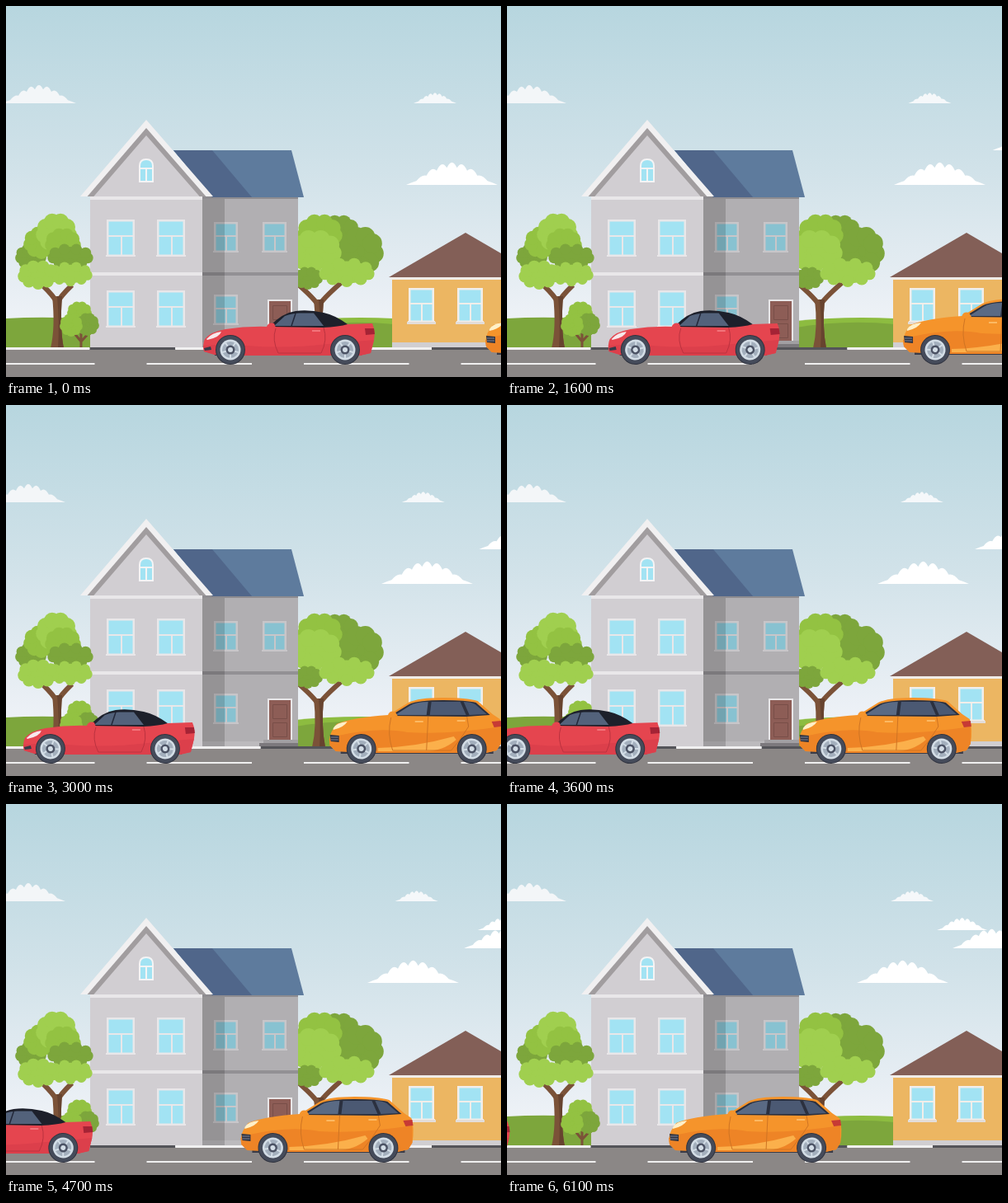
These frames come from a looping animation (600x450 px, 6.2 s). An HTML page with a canvas:

```html
<!DOCTYPE html>
<html lang="en">
<head>
<meta charset="utf-8">
<title>Street</title>
<style>
html, body { margin: 0; width: 100%; height: 100%; overflow: hidden; }
canvas { display: block; }
</style>
</head>
<body>
<canvas id="stage" width="600" height="450"></canvas>
<script>
const ctx = document.getElementById('stage').getContext('2d');
const LOOP = 6200, STEP = 100;
const LEAF = { dark: '#7da63c', mid: '#93c242', light: '#a0cf4f' };
const GLASS = '#a2e3f3', WALL = '#d1ced2', TRIM = '#e9e7e9';

function shape(color, path) {
  ctx.fillStyle = color;
  ctx.fill(new Path2D(path));
}
function line(color, width, path) {
  ctx.strokeStyle = color;
  ctx.lineWidth = width;
  ctx.stroke(new Path2D(path));
}
function rect(color, x, y, w, h) {
  ctx.fillStyle = color;
  ctx.fillRect(x, y, w, h);
}
function disc(color, x, y, rx, ry = rx) {
  ctx.fillStyle = color;
  ctx.beginPath();
  ctx.ellipse(x, y, rx, ry, 0, 0, 2 * Math.PI);
  ctx.fill();
}
function at(x, y, draw) {
  ctx.save();
  ctx.translate(x, y);
  draw();
  ctx.restore();
}

function sky() {
  const g = ctx.createLinearGradient(0, 0, 0, 400);
  g.addColorStop(0, '#b7d6df');
  g.addColorStop(0.5, '#d1e2e9');
  g.addColorStop(1, '#f1f3f8');
  rect(g, 0, 0, 600, 450);
}

// Bumps follow a sine profile above a flat base that starts at (x, y).
function cloud(x, y, width, color) {
  const bumps = 9;
  const height = u => 0.19 * width * Math.sin(Math.PI * u) ** 1.4;
  ctx.fillStyle = color;
  ctx.beginPath();
  ctx.moveTo(x, y);
  for (let i = 1; i <= bumps; i++) {
    const mid = (i - 0.5) / bumps, end = i / bumps;
    ctx.quadraticCurveTo(x + width * mid, y - 1.6 * height(mid), x + width * end, y - height(end));
  }
  ctx.fill();
}

function clouds(t) {
  cloud(-5 - 13 * Math.min(t / 700, 1), 118, 90, '#f3f6f8');
  cloud(494 - t * 0.00475, 118, 52, '#f5f8fa');
  cloud(742 - t * 0.0362, 153, 61, '#fff');
  cloud(606 - t * 0.0108, 175, 95, '#fff');
  cloud(485 - t * 0.01, 217, 111, '#fff');
}

function grass() {
  shape(LEAF.dark, 'M0 379Q50 376 110 380V415H0Z');
  shape('#8dbc40', 'M350 382Q410 376 470 379V415H350Z');
  shape(LEAF.dark, 'M350 390Q410 380 470 386V415H350Z');
}

// A leafy ellipse with a scalloped rim.
function clump(color, x, y, rx, ry) {
  const bump = Math.min(rx, ry) * 0.42, count = 9;
  disc(color, x, y, rx - bump * 0.6, ry - bump * 0.6);
  for (let i = 0; i < count; i++) {
    const a = (i + 0.25) * 2 * Math.PI / count;
    disc(color, x + (rx - bump) * Math.cos(a), y + (ry - bump) * Math.sin(a), bump);
  }
}

function trunk(x, fork, spread) {
  const top = fork - spread * 0.75;
  line('#7b5238', 6, `M${x} ${fork + 8}Q${x - 4} ${fork} ${x - spread} ${top}` +
    `M${x} ${fork + 8}Q${x + 4} ${fork} ${x + spread} ${top}`);
  shape('#7b5238', `M${x - 8} 415Q${x - 2} 390 ${x - 6} ${fork}H${x + 6}Q${x + 3} 390 ${x + 8} 415Z`);
  shape('#67432f', `M${x + 1} 415Q${x + 3} 385 ${x} ${fork}H${x + 6}Q${x + 3} 390 ${x + 8} 415Z`);
}

function leftTree() {
  trunk(62, 352, 18);
  clump(LEAF.dark, 30, 304, 19, 16);
  clump(LEAF.mid, 43, 287, 22, 20);
  clump(LEAF.light, 61, 275, 25, 24);
  clump(LEAF.mid, 69, 288, 22, 19);
  clump(LEAF.dark, 78, 304, 28, 16);
  clump(LEAF.light, 78, 325, 27, 15);
  clump(LEAF.light, 39, 326, 25, 18);
}

function bush() {
  line('#7b5238', 3, 'M91 415V397M91 407L82 396M91 407L101 396');
  clump(LEAF.mid, 89, 371, 15, 13);
  clump(LEAF.dark, 99, 386, 14, 14);
  clump(LEAF.mid, 79, 387, 14, 14);
}

function rightTree() {
  trunk(379, 356, 27);
  clump(LEAF.dark, 404, 274, 25, 21);
  clump(LEAF.dark, 430, 297, 28, 30);
  clump(LEAF.mid, 380, 276, 28, 24);
  clump(LEAF.light, 374, 297, 33, 26);
  clump(LEAF.dark, 366, 330, 18, 14);
  clump(LEAF.light, 413, 323, 34, 18);
}

function glazing(x, y, w, h, frame, glass) {
  const bar = Math.round(w * 0.53), split = Math.round(h * 0.42);
  rect(frame, x, y, w, h);
  rect(glass, x + 2.5, y + 2.5, w - 5, split - 2.5);
  rect(glass, x + 2.5, y + split + 2, bar - 3.5, h - split - 4.5);
  rect(glass, x + bar + 1, y + split + 2, w - bar - 3.5, h - split - 4.5);
  rect(frame, x - 1, y + h - 2, w + 2, 2);
}

function chevron(color, drop) {
  shape(color, `M170 ${138 + drop}L${90 + drop * 0.86} 231H${251 - drop * 0.86}Z`);
}

function greyHouse() {
  rect('#b1afb2', 238, 231, 116, 184);
  rect('#929094', 238, 323, 116, 4);
  rect('#bcbabd', 238, 408, 116, 7);
  for (const [x, y] of [[252, 262], [311, 262], [252, 350]]) {
    glazing(x, y, 29, 37, '#c8c6c9', '#88c2d1');
  }
  rect('rgba(0,0,0,.16)', 238, 231, 27, 184);
  rect('#8e8c90', 238, 231, 116, 3);

  rect(WALL, 102, 231, 136, 184);
  rect(TRIM, 102, 323, 136, 4);
  for (const x of [122, 183]) {
    for (const y of [259, 345]) glazing(x, y, 34, 45, TRIM, GLASS);
  }

  shape('#5e7b9d', 'M203 175H346L361 232H250Z');
  shape('#50668a', 'M203 175H250L298 232H250Z');
  chevron('#f1f0f1', 0);
  chevron('#a19d9f', 10);
  chevron(WALL, 19);
  rect(TRIM, 102, 231, 136, 4);

  shape('#f4f4f5', 'M161 214V194Q161 185 170 185Q179 185 179 194V214Z');
  shape(GLASS, 'M163 196V194Q163 187 170 187Q177 187 177 194V196Z');
  for (const x of [163, 171]) rect(GLASS, x, 198, 6, 14);

  rect('#e8e6e8', 317, 356, 30, 50);
  rect('#8d5d56', 319, 358, 26, 48);
  line('#784e48', 1, 'M323.5 363.5H340.5V380.5H323.5ZM323.5 385.5H340.5V402.5H323.5Z');
  rect('#a19fa2', 312, 406, 42, 4);
  rect('#7c797d', 307, 410, 47, 5);
}

function yellowHouse() {
  rect('#ecb662', 468, 328, 132, 81);
  rect('#d0ced1', 468, 408, 132, 7);
  rect('#f0ece7', 466, 329, 134, 3);
  shape('#835f57', 'M464 329L557 275L650 329Z');
  for (const x of [488, 547]) {
    glazing(x, 342, 31, 42, '#f2eeea', GLASS);
    rect('#e3ddd8', x - 2, 383, 35, 3);
  }
}

function road() {
  rect('#8b8786', 0, 416, 600, 34);
  for (let i = 0; i < 6; i++) {
    rect(i % 2 ? '#545459' : '#f1f0f1', -2 + i * 103.6, 414, 103.6, 3);
  }
  for (let x = -20; x < 600; x += 190.5) rect('#f0efef', x, 433, 127.5, 2);
}

function wheel(x, turn) {
  at(x, 417, () => {
    ctx.rotate(-turn / 17);
    disc('#30333f', 0, 0, 18);
    disc('#454b5a', 0, 0, 17);
    disc('#d3dde6', 0, 0, 12.5);
    disc('#a3afbd', 0, 0, 10);
    for (let i = 0; i < 5; i++) {
      ctx.rotate(2 * Math.PI / 5);
      rect('#d3dde6', -1, 4, 2, 7);
    }
    disc('#4b5264', 0, 0, 5.5);
    disc('#d3dde6', 0, 0, 3);
  });
}

function redCar(travel) {
  at(239 - travel, 0, () => {
    rect('#393b48', 14, 414, 178, 10);
    shape('#e5454f', 'M1 419Q-1 410 2 404Q9 395 27 392Q53 388 80 389L174 386L205 385' +
      'Q209 394 207 405L203 421L190 424H51L14 423Z');
    shape('#dc3f4b', 'M0 412Q30 409 54 412Q100 416 151 410L207 405L203 421L190 424H51L14 423L1 419Z');
    shape('#1d202b', 'M80 389Q96 372 112 370Q128 368 146 372Q160 375 175 386Q165 389 145 390Z');
    shape('#53627b', 'M86 388L99 376Q106 373 116 372.5H134L146 388Z');
    line('#23283a', 1.5, 'M107 388L112 373');
    shape('#e5454f', 'M77 389Q79 383 86 385L88 390L79 391Z');
    line('#bb323f', 1, 'M88 391Q83 405 91 421H143Q151 405 146 390');
    line('#f7858a', 1.5, 'M132 394H142');
    shape('#f7e8eb', 'M4 404Q11 396 22 395Q20 402 5 405Z');
    shape('#a52335', 'M196 391H207L208 398L197 399Z');
    shape('#353a49', 'M1 415L9 413L10 417L2 418Z');
    for (const x of [33, 172]) wheel(x, travel);
  });
}

function orangeCar(travel) {
  at(581 - travel, 0, () => {
    rect('#393b48', 14, 414, 185, 9);
    shape('#f5942b', 'M1 413Q-1 404 3 396L9 387Q28 379 72 376L96 361Q108 355 138 355' +
      'Q166 355 180 359L198 375L207 381Q211 394 208 411L203 419L190 422H58L8 420Z');
    shape('#ee8426', 'M0 405L11 401Q60 390 95 397Q145 400 208 390L208 411L203 419L190 422H58L8 420L1 413Z');
    shape('#fbb04b', 'M59 416Q105 415 151 402L154 406Q138 420 116 420H59Z');
    shape('#2b303f', 'M74 377L97 363Q108 358 138 358Q166 358 178 361L195 376L166 378Z');
    shape('#5a6a84', 'M80 376L99 364Q107 360 120 360L118 376Z');
    shape('#4b5973', 'M124 360H159L166 376H122Z');
    shape('#4b5973', 'M163 360Q172 360 177 363L191 375L170 376Z');
    shape('#f5942b', 'M71 377Q73 370 80 372L83 377L75 379Z');
    line('#cf7423', 1, 'M75 379Q70 399 77 419H148Q160 405 169 390L167 378M120 378L118 419');
    line('#ffc676', 1.5, 'M104 384H114M155 383H165');
    shape('#fff0c8', 'M5 392Q9 385 22 384Q18 391 5 394Z');
    shape('#c63a35', 'M197 384L208 383L209 390L200 391Z');
    shape('#303442', 'M1 400L12 401V409L2 408Z');
    line('#80869a', 1, 'M2 403H11M2 406H11');
    for (const x of [39, 173]) wheel(x, travel);
  });
}

function draw(t) {
  sky();
  clouds(t);
  grass();
  rightTree();
  greyHouse();
  yellowHouse();
  leftTree();
  bush();
  road();
  redCar(t * 0.0727);
  orangeCar(t * 0.0631);
}

function tick(now) {
  draw(Math.floor((now % LOOP) / STEP) * STEP);
  requestAnimationFrame(tick);
}
draw(0);
requestAnimationFrame(tick);
</script>
</body>
</html>
```
